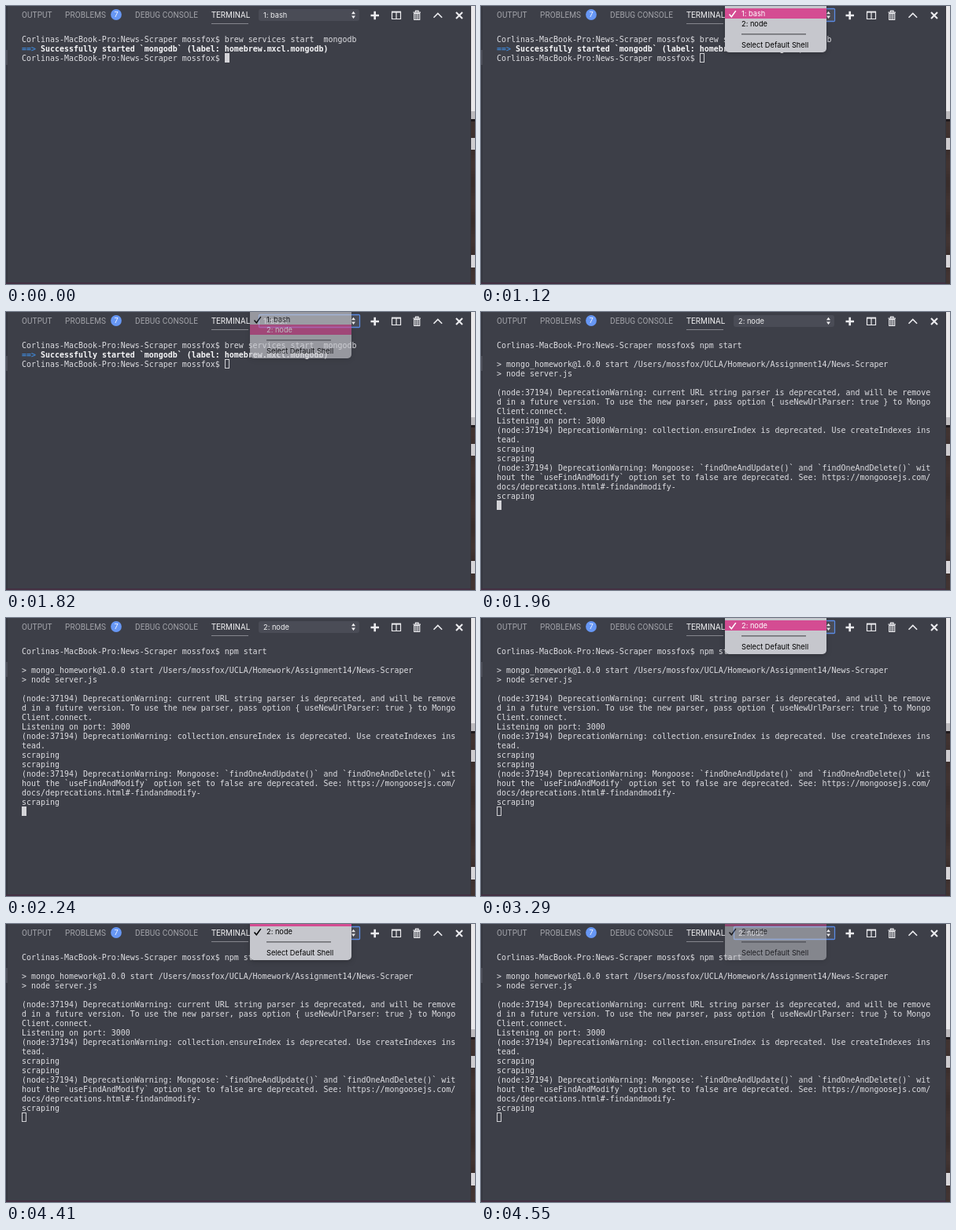
Write an HTML page that moves like this. It is 596 px wide and 354 px high and loops after 4.62 s.

```html
<!DOCTYPE html>
<html lang="en">
<head>
<meta charset="utf-8">
<title>Terminal shell switch</title>
<style>
  html, body { margin: 0; width: 100%; height: 100%; overflow: hidden; background: #3d3f48; }
  svg { display: block; width: 596px; height: 354px; }
  text { white-space: pre; }
  .term { font: 9.966px "DejaVu Sans Mono", monospace; fill: #dedee2; }
  .bold { font-weight: bold; fill: #f6f6f8; }
  .tab { font: 10px Roboto, sans-serif; letter-spacing: .1px; fill: #a3a4aa; }
  .tab .active { fill: #f2f2f4; }
  .ui { font: 9.25px Inter, sans-serif; }
  .icon { fill: none; stroke: #ececef; }
  #menu { filter: drop-shadow(0 2px 3px rgba(0, 0, 0, .2)); }
</style>
</head>
<body>
<svg viewBox="0 0 596 354">
  <rect width="596" height="354" fill="#3d3f48"/>

  <!-- desktop showing around the panel -->
  <rect width="2" height="354" fill="#353740"/>
  <rect y="56" width="2" height="19" fill="#4b4d57"/>
  <rect y="352" width="596" height="2" fill="#432f42"/>
  <g id="rock"></g>
  <rect x="591" width="5" height="134" fill="#e9e8ea"/>
  <rect x="591" y="134" width="5" height="10" fill="#bdbbbe"/>
  <rect x="591" y="144" width="5" height="3" fill="#1f1a1d"/>
  <rect x="591" y="168" width="5" height="15" fill="#cecccf"/>
  <rect x="591" y="317" width="5" height="16" fill="#d8d6d9"/>
  <rect x="590" width="1" height="354" fill="#34353d"/>

  <!-- panel header -->
  <g class="tab">
    <text x="20" y="14.7">OUTPUT</text>
    <text x="75" y="14.7">PROBLEMS</text>
    <text x="164" y="14.7">DEBUG CONSOLE</text>
    <text class="active" x="261" y="14.7">TERMINAL</text>
  </g>
  <rect x="261" y="22" width="47" height="1" fill="#85868d"/>
  <circle cx="140" cy="11" r="6.9" fill="#6797f4"/>
  <text class="ui" x="140" y="14.3" text-anchor="middle" fill="#f1f4ff">7</text>

  <rect x="321" y="4" width="128" height="15" rx="3" fill="#4a4c56"/>
  <text id="label" class="ui" x="327" y="14.8" fill="#f0f0f2"></text>
  <path d="M439 10.2l2.5-3.4 2.5 3.4zM439 12.6l2.5 3.4 2.5-3.4z" fill="#f0f0f2"/>
  <rect id="ring" x="321.5" y="3.5" width="128" height="16" rx="1" fill="none" stroke="#5b8be4" stroke-width="1.3"/>

  <g class="icon">
    <path d="M463.5 12h10.5M468.7 6.8v10.4" stroke-width="2.6"/>
    <path d="M490.5 7.5h11v9h-11zM496 7.5v9" stroke-width="1.2"/>
    <path d="M490 7.6h12" stroke-width="2"/>
    <path d="M517.5 8.2h9.5M520.5 7.5v-1.3h3.5v1.3" stroke-width="1.3"/>
    <path d="M518.7 9.5h7v8h-7zM521 10v7M523.4 10v7" stroke-width="1.2"/>
    <path d="M543.5 14.8l5.3-5.3 5.3 5.3" stroke-width="1.6"/>
    <path d="M572 8l8 8M580 8l-8 8" stroke-width="2.1"/>
  </g>

  <g id="bash" class="term"></g>
  <g id="node" class="term"></g>
  <rect id="cursor" width="6" height="12"/>

  <g id="menu" class="ui">
    <path d="M310 -16H439V54a5 5 0 0 1-5 5H315a5 5 0 0 1-5-5z" fill="#c6c7cd"/>
    <rect id="pick" x="310" width="129" height="13" fill="#d44c92"/>
    <text id="item0" x="331" y="13.2">1: bash</text>
    <text id="item1" x="331" y="26.2">2: node</text>
    <rect x="331" y="35.4" width="82" height="1" fill="#3a3a3f"/>
    <text x="331" y="52.5">Select Default Shell</text>
    <path id="tick" fill="none" stroke-width="1.6"/>
  </g>
</svg>
<script>
const $ = id => document.getElementById(id);
const SVG = "http://www.w3.org/2000/svg";
const LOOP = 4620, STEP = 70;
const OPEN_1 = 1120, HOVER_1 = 1470, FADE_1 = 1820, SWITCH = 1960;
const OPEN_2 = 3290, HOVER_2 = 4410, FADE_2 = 4550;
const ROW = 13;

const prompt = "Corlinas-MacBook-Pro:News-Scraper mossfox$ ";
const nodeLog = `${prompt}npm start

> mongo_homework@1.0.0 start /Users/mossfox/UCLA/Homework/Assignment14/News-Scraper
> node server.js

(node:37194) DeprecationWarning: current URL string parser is deprecated, and will be remove
d in a future version. To use the new parser, pass option { useNewUrlParser: true } to Mongo
Client.connect.
Listening on port: 3000
(node:37194) DeprecationWarning: collection.ensureIndex is deprecated. Use createIndexes ins
tead.
scraping
scraping
(node:37194) DeprecationWarning: Mongoose: \`findOneAndUpdate()\` and \`findOneAndDelete()\` wit
hout the \`useFindAndModify\` option set to false are deprecated. See: https://mongoosejs.com/
docs/deprecations.html#-findandmodify-
scraping`;

function add(parent, tag, attrs) {
  const el = document.createElementNS(SVG, tag);
  for (const k in attrs) el.setAttribute(k, attrs[k]);
  parent.append(el);
  return el;
}

// Places a string on the 6 x 12 character grid.
function put(parent, row, col, str, cls = "", color = "") {
  const t = add(parent, "text", { x: 20 + col * 6, y: 45.6 + row * 12, class: cls });
  t.style.fill = color;
  t.textContent = str;
}

put($("bash"), 0, 0, prompt + "brew services start  mongodb");
put($("bash"), 1, 0, "==>", "bold", "#3f83cf");
put($("bash"), 1, 4, "Successfully started `mongodb` (label: homebrew.mxcl.mongodb)", "bold");
put($("bash"), 2, 0, prompt);
nodeLog.split("\n").forEach((line, i) => put($("node"), i, 0, line));

// Uneven brown stone along the right edge.
for (let y = 134; y < 354; y += 4) {
  const light = 21 + 6 * Math.sin(y * .13) + 5 * Math.sin(y * 1.7);
  add($("rock"), "rect", { x: 591, y, width: 5, height: 4, fill: `hsl(8 14% ${light}%)` });
}

function set(id, attrs) {
  for (const k in attrs) $(id).setAttribute(k, attrs[k]);
}
const show = (id, on) => set(id, { visibility: on ? "visible" : "hidden" });

// The menu opens at once and fades out over two steps.
function menuAlpha(t, open, fade, first) {
  if (t < open || t >= fade + 2 * STEP) return 0;
  return t < fade ? 1 : t < fade + STEP ? first : first * .35;
}

function draw(time) {
  const t = Math.floor(time % LOOP / STEP) * STEP;
  const node = t >= SWITCH;
  const alpha = node ? menuAlpha(t, OPEN_2, FADE_2, .52) : menuAlpha(t, OPEN_1, FADE_1, .66);
  const focused = t < (node ? OPEN_2 : OPEN_1);
  const current = node ? 1 : 0;
  const hover = t >= (node ? HOVER_2 : HOVER_1) ? 1 - current : current;

  show("bash", !node);
  show("node", node);
  show("ring", !focused);
  $("label").textContent = node ? "2: node" : "1: bash";

  const inset = focused ? 0 : .5;
  set("cursor", {
    x: (node ? 20 : 278) + inset,
    y: (node ? 240 : 60) + inset,
    width: 6 - 2 * inset,
    height: 12 - 2 * inset,
    fill: focused ? "#d4d4d8" : "none",
    stroke: focused ? "none" : "#d0d0d4"
  });

  // The current entry lines up with the select box.
  show("menu", alpha > 0);
  set("menu", { opacity: alpha, transform: `translate(0 ${-ROW * current})` });
  const ink = i => hover === i ? "#fff" : "#000";
  set("pick", { y: 3 + ROW * hover });
  set("item0", { fill: ink(0) });
  set("item1", { fill: ink(1) });
  set("tick", { d: `M315.5 ${10.5 + ROW * current}l2.8 3.2 5.5-7.6`, stroke: ink(current) });
}

const start = performance.now();
function loop() {
  draw(performance.now() - start);
  requestAnimationFrame(loop);
}
loop();
</script>
</body>
</html>
```
